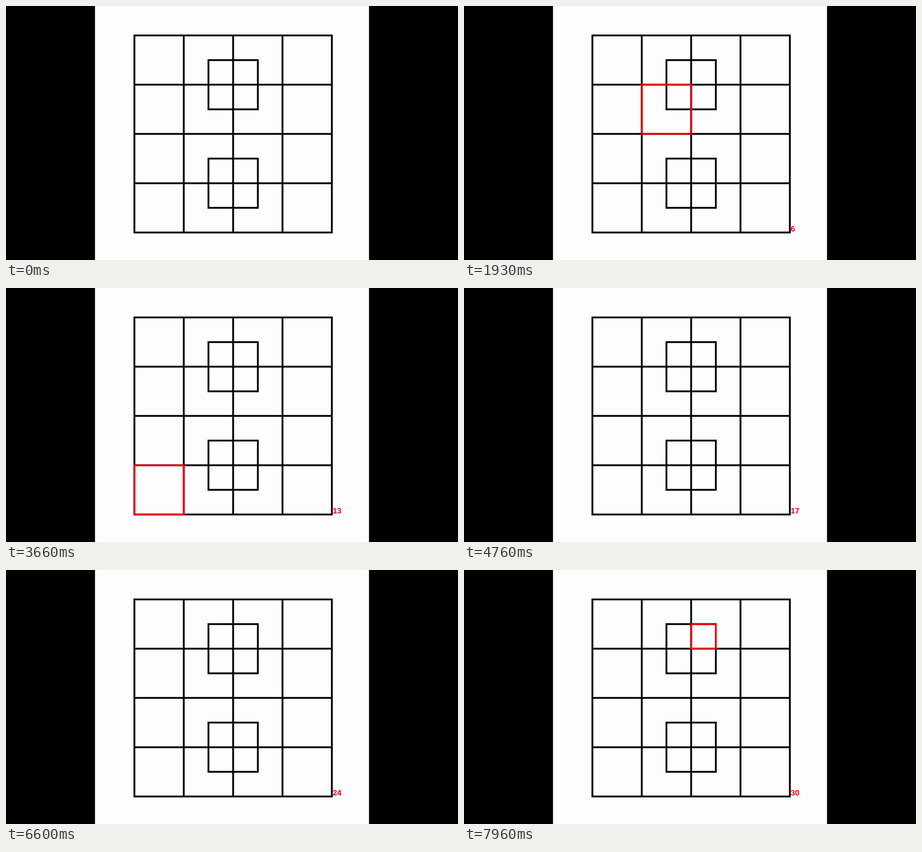
An HTML page for the animation above (8000 ms loop, 998 px wide and 561 px high).

```html
<!DOCTYPE html>
<html lang="en">
<head>
<meta charset="utf-8">
<title>Counting squares</title>
<style>
  html, body { margin: 0; width: 100%; height: 100%; overflow: hidden; background: #000; }
  svg { display: block; width: 100%; height: 100%; }
  text { font: bold 17px "Liberation Sans", Arial, sans-serif; fill: #e60012; }
  #grid, #mark { fill: none; stroke: #000; stroke-width: 4; }
  #mark { stroke: #e9000f; }
</style>
</head>
<body>
<svg viewBox="0 0 998 561">
  <rect x="196.5" width="605" height="561" fill="#fdfdfd"/>
  <path id="grid"/>
  <path id="mark"/>
  <text id="count" x="721.5" y="498"></text>
</svg>
<script>
const LOOP = 8000, START = 615, STEP = 250, LIT = 125;
const LEFT = 283.5, TOP = 65, CELL = 109;
const [grid, mark, count] = ['grid', 'mark', 'count'].map(id => document.getElementById(id));

// Column, row and size are measured in cells.
const square = (col, row, size) => {
  const side = size * CELL;
  return `M${LEFT + col * CELL} ${TOP + row * (CELL - 0.2)}h${side}v${side - 0.2 * size}h${-side}z`;
};

const block = (n, size, col = 0, row = 0) =>
  Array.from({ length: n * n }, (_, i) => {
    const unit = size < 1 ? size : 1;
    return square(col + i % n * unit, row + Math.floor(i / n) * unit, size);
  });

const cells = block(4, 1);
const upper = square(1.5, 0.5, 1);
const lower = square(1.5, 2.5, 1);
const whole = square(0, 0, 4);

const order = [
  ...cells,
  lower, upper,
  ...block(3, 2),
  whole,
  ...block(2, 0.5, 1.5, 0.5)
];

grid.setAttribute('d', [...cells, upper, lower, whole].join(''));

function draw(now) {
  const t = now % LOOP - START;
  const i = Math.floor(t / STEP);
  const lit = i >= 0 && t - i * STEP < LIT;
  mark.setAttribute('d', lit ? order[i] : '');
  count.textContent = i >= 0 ? i + 1 : '';
  requestAnimationFrame(draw);
}
draw(performance.now());
</script>
</body>
</html>
```
